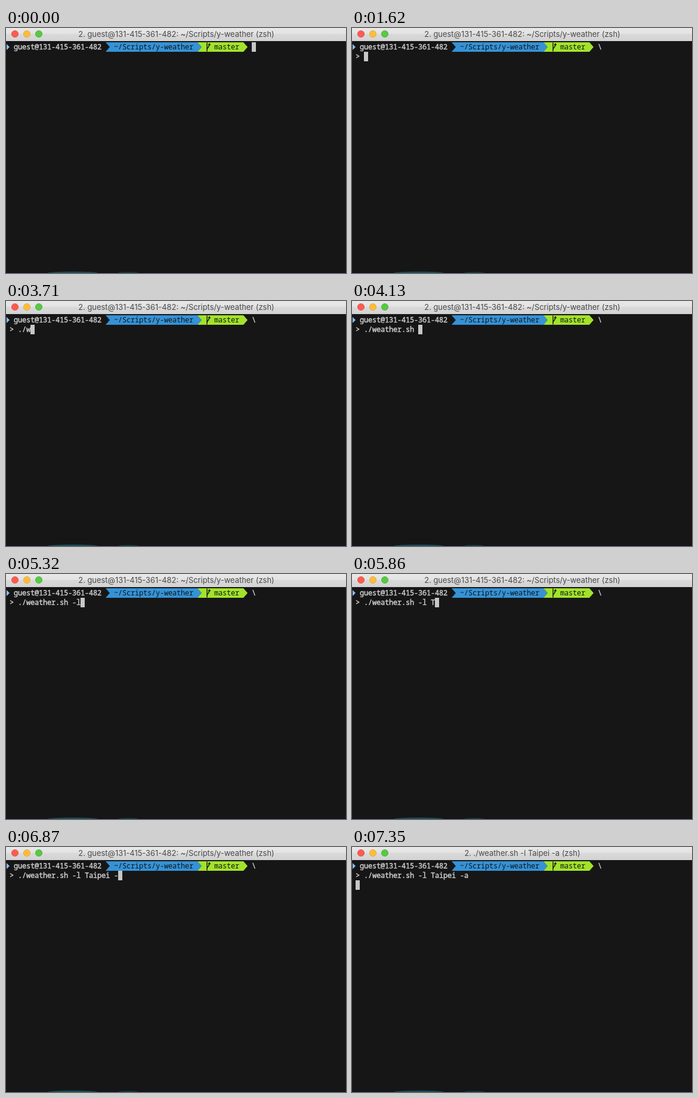
An HTML page for the animation above (8000 ms loop, 570x412 px).

```html
<!DOCTYPE html>
<html>
<head>
<meta charset="utf-8">
<title>Terminal</title>
<style>
  html, body { margin: 0; width: 100%; height: 100%; overflow: hidden; background: #161616; }
  svg { display: block; }
  text { white-space: pre; }
  .mono { font: 500 12px "Noto Sans Mono", "DejaVu Sans Mono", monospace; letter-spacing: -0.2px; fill: #d0d0d0; stroke: #d0d0d0; stroke-width: .4px; }
  .mono .dark { fill: #101418; stroke: none; }
  #title { font: 12.9px Inter, Roboto, sans-serif; fill: #4a4a4a; text-anchor: middle; }
</style>
</head>
<body>
<svg width="570" height="412" viewBox="0 0 570 412">
  <defs>
    <linearGradient id="bar" x2="0" y2="1">
      <stop offset="0" stop-color="#e8e8e8"/>
      <stop offset=".47" stop-color="#e2e2e2"/>
      <stop offset=".47" stop-color="#d9d9d9"/>
      <stop offset="1" stop-color="#d3d3d3"/>
    </linearGradient>
  </defs>
  <rect width="570" height="412" fill="#161616"/>
  <rect y="411" width="570" height="1" fill="#0a0a38"/>
  <ellipse cx="112" cy="412" rx="42" ry="2.5" fill="#1b4a5a"/>
  <ellipse cx="205" cy="412" rx="17" ry="2" fill="#143444"/>

  <rect width="570" height="22" fill="url(#bar)"/>
  <circle cx="15" cy="10" r="5.6" fill="#fc5b52" stroke="#e0483f" stroke-width=".8"/>
  <circle cx="35" cy="10" r="5.6" fill="#fdbd3a" stroke="#e0a030" stroke-width=".8"/>
  <circle cx="55" cy="10" r="5.6" fill="#58c943" stroke="#43ac33" stroke-width=".8"/>
  <text id="title" x="285.5" y="15"></text>

  <path d="M1 27l5 5-5 5z" fill="#8fbcf0"/>
  <path d="M167 24h154l7 8-7 8H167l7-8z" fill="#3592d6"/>
  <path d="M321 24h77l7 8-7 8h-77l7-8z" fill="#a2e32a"/>
  <path d="M337 24.5v15M337 36.5c0-4 4-3 4-9.5M339.3 28.8l1.7-2.3 1.5 2.3" fill="none" stroke="#101418" stroke-width="1.4"/>
  <g class="mono">
    <text x="13" y="36">guest@131-415-361-482</text>
    <text class="dark" x="181" y="36">~/Scripts/y-weather</text>
    <text class="dark" x="349" y="36">master</text>
    <text id="line0" x="412" y="36"></text>
    <text id="line1" x="6" y="52"></text>
  </g>
  <rect id="cursor" width="7" height="16" fill="#c7c7c7"/>
</svg>
<script>
const LOOP = 8000, CELL = 7, ROW = 16;
const keys = [
  [1080, '\\'], [1620, '\n> '], [2450, '.'], [2630, '/'],
  [3710, 'w'], [3830, 'e'], [4130, 'ather.sh '],
  [4970, '-'], [5320, 'l'], [5560, ' '],
  [5860, 'T'], [6040, 'a'], [6100, 'i'], [6280, 'p'], [6400, 'e'], [6510, 'i'], [6630, ' '],
  [6870, '-'], [6990, 'a'], [7230, '\n']
];
const $ = id => document.getElementById(id);

function draw(t) {
  const lines = keys.filter(([at]) => at <= t).map(k => k[1]).join('').split('\n');
  const row = lines.length - 1;
  $('line0').textContent = lines[0];
  $('line1').textContent = lines[1] || '';
  $('cursor').setAttribute('x', (row ? 6 : 412) + lines[row].length * CELL);
  $('cursor').setAttribute('y', 24 + row * ROW);
  $('title').textContent = t < 7350
    ? '2. guest@131-415-361-482: ~/Scripts/y-weather (zsh)'
    : '2. ./weather.sh -l Taipei -a (zsh)';
}

let start;
function frame(now) {
  start ??= now;
  draw((now - start) % LOOP);
  requestAnimationFrame(frame);
}
draw(0);
requestAnimationFrame(frame);
</script>
</body>
</html>
```
